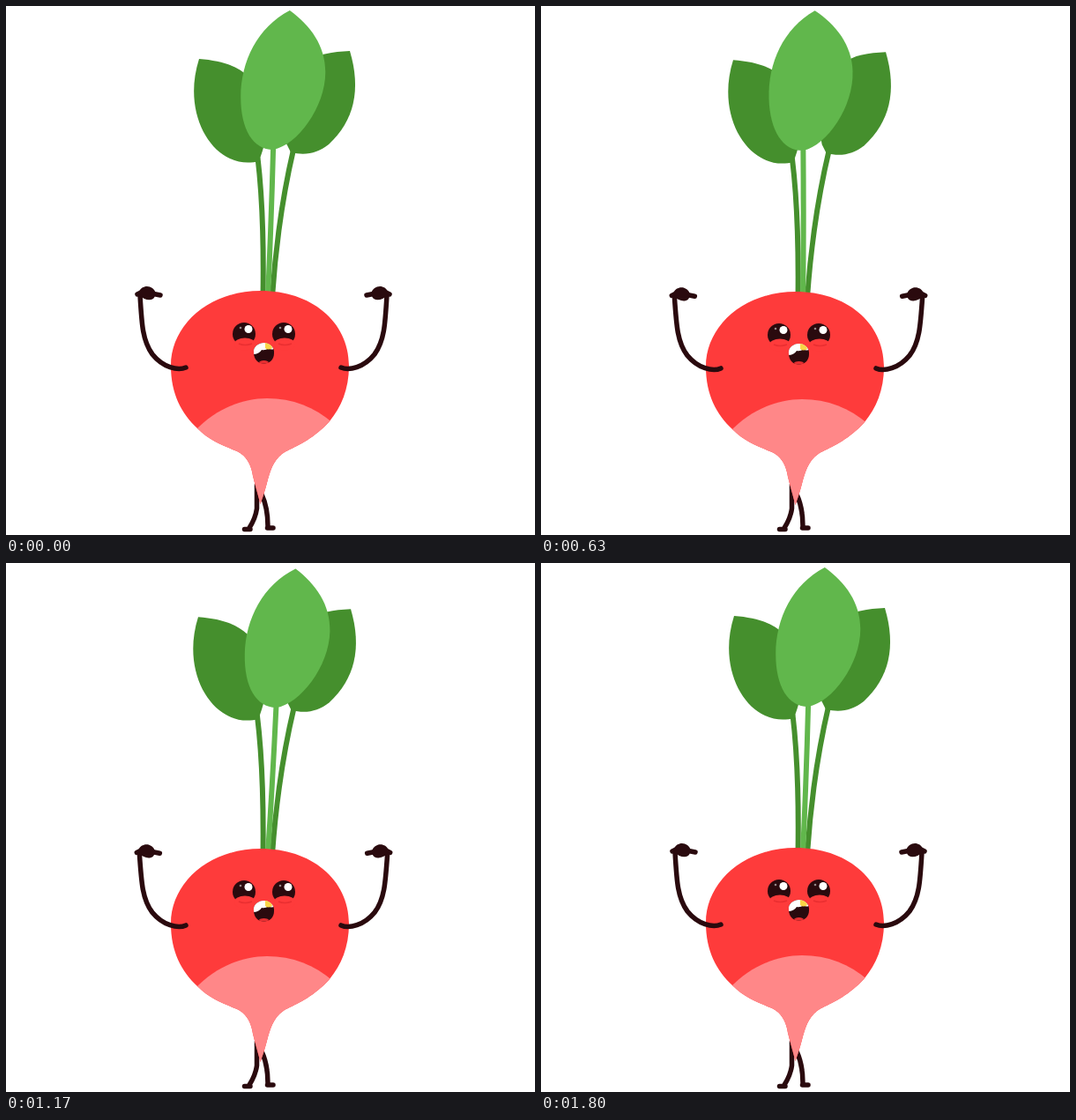
These frames come from a looping animation (600 by 600 pixels, 1.83 s). An HTML page:

```html
<!DOCTYPE html>
<html lang="en">
<head>
<meta charset="utf-8">
<title>Dancing radish</title>
<style>
  html, body { margin: 0; width: 100%; height: 100%; overflow: hidden; background: #fff; }
  svg { display: block; width: 100vw; height: 100vh; }
  .line { fill: none; stroke: #2a0a0e; stroke-width: 5.5; stroke-linecap: round; stroke-linejoin: round; }
  .ink { fill: #2a0a0e; }
  .red { fill: #fe3b3b; }
  .dark { fill: #458f2d; }
  .light { fill: #61b74c; }
  .stem { fill: none; stroke-width: 6; }
</style>
</head>
<body>
<svg viewBox="0 0 600 600">
  <defs>
    <path id="shape" d="M289 323C345 323 389 357 389 408C389 435 380 455 367 471C350 490 332 498 320 504C304 511 300 527 297 537C294 549 291 558 288.500 565C286 555 283 545 280 533C278 519 272 510 262 505C248 499 232 494 217 479C199 462 187 440 187 408C187 362 230 323 289 323Z"/>
    <path id="lips" d="M281 393C280 387 286 382 292.500 382C299 382 305 387 304 394C304 401 299 405.500 292.500 405.500C286 405.500 281 401 281 393Z"/>
    <clipPath id="inBody"><use href="#shape"/></clipPath>
    <clipPath id="inMouth"><use href="#lips"/></clipPath>
    <g id="arm">
      <path class="line" d="M204 410C195 414 178 410 166 395C155 380 154 362 152 328"/>
      <path class="line" d="M149 327L155 324M165 326L175 328"/>
      <path class="ink" d="M151 324C153 318 161 316 166 320C170 323 171 328 167 332C162 335 156 332 152 329Z"/>
    </g>
    <g id="eye">
      <circle class="ink" r="13"/>
      <circle cx="5" cy="-5.500" r="4.500" fill="#fff"/>
      <circle cx="-4" cy="-7" r="1.300" fill="#fff" opacity=".5"/>
      <ellipse class="red" cx="1" cy="11.500" rx="12" ry="7"/>
      <path d="M-6 11Q1 14 9 11" fill="none" stroke="#ea2f31" stroke-width="1.500"/>
    </g>
  </defs>

  <path class="line" d="M284.500 543V570Q283 581 276 592M270.500 593.500H277"/>
  <path class="line" d="M290 554Q297 569 297 590M296.500 592H303"/>

  <g id="radish">
    <g id="leftLeaf">
      <path class="stem" stroke="#458f2d" d="M285.500 172Q293 235 291.500 330"/>
      <path class="dark" d="M219 60C245 62 262 68 275 80C298 100 301 135 291 164L287 176C275 179 262 178 250 171C222 155 203 110 219 60Z"/>
    </g>
    <g id="rightLeaf">
      <path class="stem" stroke="#458f2d" d="M326 163Q308 240 302 330"/>
      <path class="dark" d="M390 51C403 95 395 130 366 157C353 167 340 170 323 166L318 156C312 125 315 90 340 65C354 54 370 52 390 51Z"/>
    </g>
    <g id="midLeaf">
      <path class="stem" stroke="#61b74c" d="M303 158Q301 240 297 330"/>
      <path class="light" d="M321.500 5C285 24 266 63 266 103C266 140 280 163 303 163C330 158 362 115 362 75C362 45 345 22 321.500 5Z"/>
    </g>

    <use href="#shape" class="red"/>
    <path clip-path="url(#inBody)" fill="#ff8788" d="M214 482C238 457 268 445 296 445C325 445 350 455 371 473V570H210Z"/>

    <use href="#eye" x="270" y="372"/>
    <use href="#eye" x="315" y="372"/>
    <use href="#lips" class="ink"/>
    <g clip-path="url(#inMouth)">
      <path fill="#fff" d="M280 380H305V388Q301 391 298 388Q294 391 290 390Q287 395 280 395Z"/>
      <path fill="#f8d548" d="M294 381H300L302 388Q297 391 294 388Z"/>
      <ellipse cx="292.500" cy="405" rx="6" ry="3" fill="#e72f32"/>
    </g>

    <use id="leftArm" href="#arm"/>
    <g transform="translate(584 0) scale(-1 1)"><use id="rightArm" href="#arm"/></g>
  </g>
</svg>
<script>
  const LOOP = 1830, STEP = 30, BEAT = 300, SWAY = 900;
  // time in the sway cycle, lean of the middle leaf in degrees
  const keys = [[-90, 0.5], [100, -0.45], [310, 1.4], [590, -2.15], [810, 0.5], [1000, -0.45]];
  const el = id => document.getElementById(id);
  const ease = u => (1 - Math.cos(Math.PI * u)) / 2;
  const turn = (id, deg, x, y) => el(id).setAttribute('transform', `rotate(${deg} ${x} ${y})`);

  function lean(t) {
    const i = keys.findIndex(k => k[0] > t);
    const [t0, a] = keys[i - 1], [t1, b] = keys[i];
    return a + (b - a) * ease((t - t0) / (t1 - t0));
  }

  function pose(t) {
    const dip = ease(2 * (t % BEAT) / BEAT);
    el('radish').setAttribute('transform', `translate(0 ${10 * dip})`);
    turn('leftArm', -4.8 * dip, 204, 410);
    turn('rightArm', -4.8 * dip, 204, 410);
    turn('leftLeaf', -2.3 * dip, 291, 325);
    turn('rightLeaf', 2.3 * dip, 302, 325);
    turn('midLeaf', lean(t % SWAY), 297, 325);
  }

  const start = performance.now();
  function tick() {
    const t = (performance.now() - start) % LOOP;
    pose(Math.floor(t / STEP) * STEP);
    requestAnimationFrame(tick);
  }
  tick();
</script>
</body>
</html>
```
